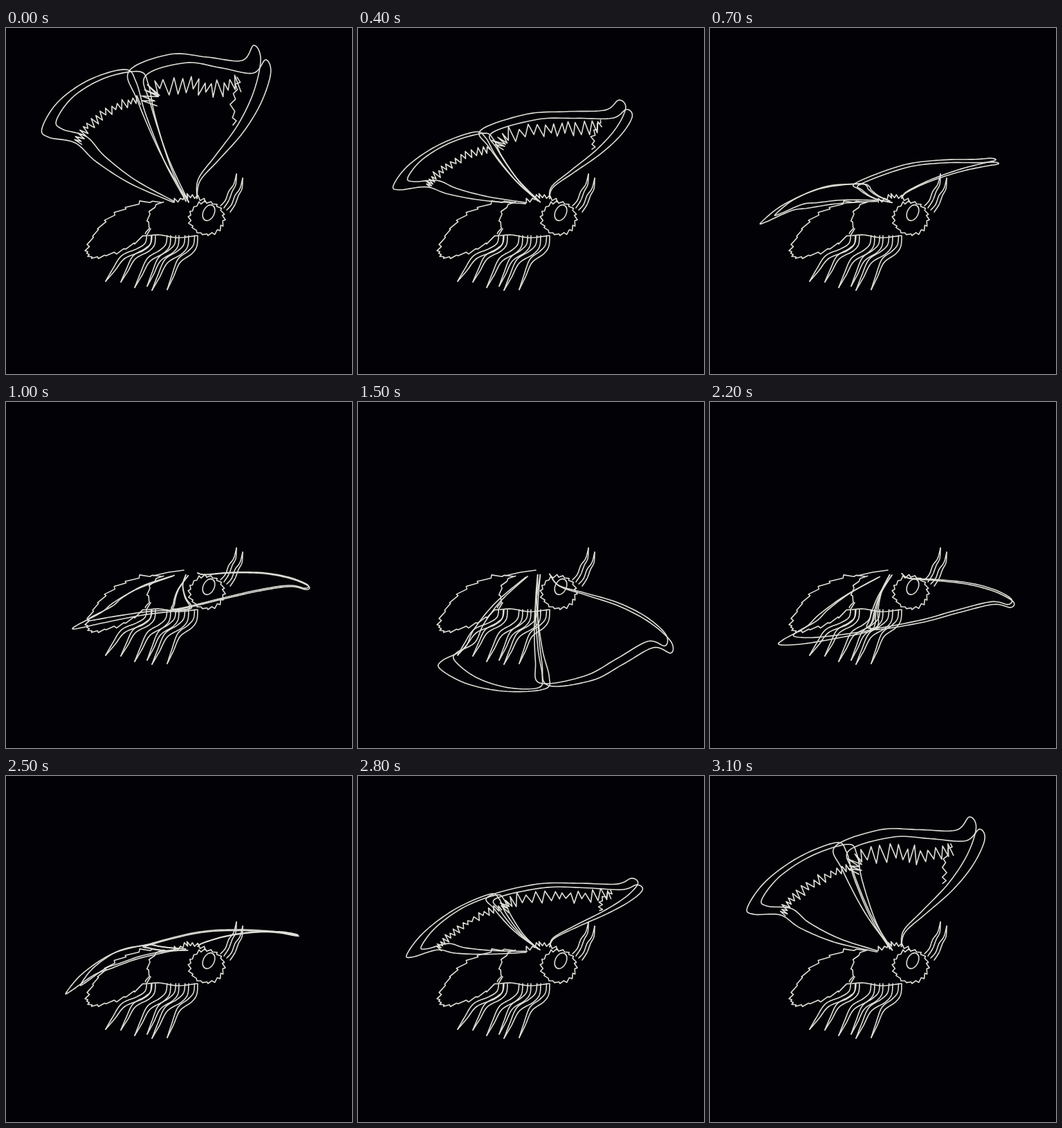
Write an HTML page with a canvas that moves like this. It is 500x500 px and loops after 3200 ms.

```html
<!DOCTYPE html>
<html lang="en">
<head>
<meta charset="utf-8">
<title>Moth in flight</title>
<style>
html, body { margin: 0; width: 100%; height: 100%; overflow: hidden; background: #020206; }
canvas { display: block; width: 500px; height: 500px; }
</style>
</head>
<body>
<canvas id="stage" width="500" height="500"></canvas>
<script>
const ctx = document.getElementById('stage').getContext('2d');
const LOOP = 3200, STEP = 100;

// The flap: where the tip and the inner corner of each wing are over time.
const flap = [
  { t: 0,    fore: [360,25, 178,60],    hind: [52,145, 174,60] },
  { t: 400,  fore: [379,104, 178,146],  hind: [51,228, 170,150] },
  { t: 1000, fore: [436,271, 248,300],  hind: [99,328, 262,300] },
  { t: 1500, fore: [454,362, 276,411],  hind: [119,386, 272,414] },
  { t: 1900, fore: [453,348, 272,402],  hind: [112,376, 268,403] },
  { t: 2500, fore: [416,229, 203,244],  hind: [87,313, 203,244] },
  { t: 3100, fore: [377,59, 181,100],   hind: [54,190, 184,96] }
];

// Wing shapes in the raised pose; every other pose is a skewed copy.
// `gap` moves the tip and corner of the second outline.
const wings = {
  fore: {
    root: [270, 249], gap: [17,21, 24,7],
    outline: pairs([276,246, 278,218, 303,184, 335,140, 358,92, 368,45, 358,25, 341,47, 290,42, 237,38, 178,62, 190,105, 225,185, 264,252]),
    fringe: pairs([203,108, 213,84, 260,81, 300,87, 337,80]),
    edge: pairs([337,72, 328,104, 330,140])
  },
  hind: {
    root: [258, 250], gap: [21,-12, 20,3],
    outline: pairs([242,252, 180,225, 130,193, 100,166, 62,158, 52,145, 75,107, 120,75, 172,60, 188,78, 202,125, 230,195, 260,250]),
    fringe: pairs([102,164, 112,147, 135,128, 165,111, 193,104])
  }
};

function pairs(flat) {
  const out = [];
  for (let i = 0; i < flat.length; i += 2) out.push([flat[i], flat[i + 1]]);
  return out;
}

function random(seed) {
  return () => {
    seed = (seed * 1664525 + 1013904223) >>> 0;
    return seed / 4294967296;
  };
}

// Key i with its time unwrapped past either end of the loop.
function keyAt(i, name) {
  const n = flap.length, lap = Math.floor(i / n), key = flap[i - lap * n];
  return { t: key.t + lap * LOOP, v: key[name] };
}

// Smooth cubic through the keys of one wing.
function anchors(name, t) {
  let i = flap.length - 1;
  while (flap[i].t > t) i--;
  const [a, b, c, d] = [-1, 0, 1, 2].map(k => keyAt(i + k, name));
  const span = c.t - b.t, u = (t - b.t) / span, u2 = u * u, u3 = u2 * u;
  return b.v.map((p, k) => {
    const q = c.v[k];
    const m = (q - a.v[k]) / (c.t - a.t) * span;
    const n = (d.v[k] - p) / (d.t - b.t) * span;
    return (2*u3 - 3*u2 + 1) * p + (u3 - 2*u2 + u) * m + (3*u2 - 2*u3) * q + (u3 - u2) * n;
  });
}

// Maps raised-pose points so that tip and corner land on the given anchors.
function skew(pts, name, to) {
  const [rx, ry] = wings[name].root;
  const rel = ([tx, ty, cx, cy]) => [tx - rx, ty - ry, cx - rx, cy - ry];
  const [ax, ay, bx, by] = rel(flap[0][name]);
  const [tx, ty, cx, cy] = rel(to);
  const det = ax * by - bx * ay;
  const arch = 55 * Math.exp(-((cy / 70) ** 2));
  return pts.map(([x, y]) => {
    const dx = x - rx, dy = y - ry;
    const u = (dx * by - bx * dy) / det, v = (ax * dy - ay * dx) / det;
    return [rx + u * tx + v * cx, ry + u * ty + v * cy - arch * u * (1 - u)];
  });
}

function pointOn(pts, s) {
  const last = pts.length - 1;
  const i = Math.min(Math.floor(s * last), last - 1), u = s * last - i;
  const p = k => pts[Math.max(0, Math.min(last, i + k))];
  return [0, 1].map(x => {
    const a = p(-1)[x], b = p(0)[x], c = p(1)[x], d = p(2)[x];
    return b + u / 2 * (c - a + u * (2*a - 5*b + 4*c - d + u * (3*b - a - 3*c + d)));
  });
}

function line(pts) {
  ctx.beginPath();
  pts.forEach(([x, y]) => ctx.lineTo(x, y));
  ctx.stroke();
}

function curve(pts) {
  const n = (pts.length - 1) * 10;
  line(Array.from({ length: n + 1 }, (_, i) => pointOn(pts, i / n)));
}

// Zigzag along a curve; `lean` tips each tooth forward along it.
function fur(pts, teeth, out, back, lean, seed) {
  const rnd = random(seed), n = teeth * 2, path = [];
  for (let i = 0; i <= n; i++) {
    const tooth = i % 2;
    const shift = (tooth ? lean : 0) + 0.5 * (rnd() - 0.5);
    const s = Math.max(0, Math.min(1, (i + shift) / n));
    const [x, y] = pointOn(pts, s);
    const [x0, y0] = pointOn(pts, Math.max(0, s - 0.02));
    const [x1, y1] = pointOn(pts, Math.min(1, s + 0.02));
    const len = Math.hypot(x1 - x0, y1 - y0) || 1;
    const h = (tooth ? out : -back) * (0.4 + 0.9 * rnd());
    path.push([x + (y1 - y0) / len * h, y - (x1 - x0) / len * h]);
  }
  line(path);
}

function drawWing(name, t, lift, step) {
  const { outline, fringe, edge, gap } = wings[name];
  const near = anchors(name, t);
  const far = near.map((v, i) => v + gap[i] * (name === 'hind' && i < 2 ? 1 : lift));
  curve(skew(outline, name, near));
  curve(skew(outline, name, far));
  if (lift < 0.3) return;
  const size = name === 'fore' ? 4 + 9 * lift : 3 + 4 * lift;
  fur(skew(fringe, name, near), 16, size, size, 0, 40 + step * 7);
  if (edge) fur(skew(edge, name, near), 5, 3, 3, 0, 60 + step);
}

function drawLeg(x, y, tipX, tipY) {
  const dx = x - tipX, dy = tipY - y;
  const at = (fx, fy) => [tipX + dx * fx, y + dy * fy];
  curve([at(1, 0), at(0.97, 0.2), at(0.8, 0.34), at(0.42, 0.5), at(0.2, 0.77), at(0, 1)]);
  curve([at(0.9, 0), at(0.86, 0.17), at(0.68, 0.29), at(0.35, 0.44), at(0.15, 0.74), at(0, 1)]);
}

function drawAntenna(x, y) {
  for (const w of [0, 5]) {
    curve([[310 + w, 257 + w * 0.6], [317 + w, 249], [322 + w, 236], [329 + w * 0.6, 226], [333, 211]]
      .map(([px, py]) => [px + x, py + y]));
  }
}

function drawBody(wingsDown) {
  // abdomen, top and underside
  fur(pairs([224,252, 194,254, 163,267, 139,285, 125,305, 118,324]), 9, -4, 0, 0.8, 11);
  fur(pairs([209,290, 180,314, 150,326, 126,331, 118,324]), 9, 3, 0, 0.8, 5);
  // thorax
  fur(pairs([228,252, 214,262, 207,276, 209,288, 202,298]), 5, -4, 1, 0.6, 23);
  if (wingsDown) line([[213, 251], [235, 246], [257, 243]]);
  else fur(pairs([243,251, 258,246, 270,243, 288,250]), 7, 4, 2, 0, 31);
  curve(pairs([205,300, 222,299, 248,303, 276,300]));
  // head
  const ring = Array.from({ length: 17 }, (_, i) => {
    const a = i / 16 * Math.PI * 2 - Math.PI / 2;
    return [290 + 24 * Math.cos(a), 275 + 23 * Math.sin(a)];
  });
  fur(ring, 18, 3, 1, 0.5, 17);
  ctx.beginPath();
  ctx.ellipse(293, 267, 8, 12, 0.45, 0, Math.PI * 2);
  ctx.stroke();
  drawAntenna(0, 0);
  drawAntenna(9, 6);
  [[210, 144, 366], [216, 166, 367], [238, 186, 375],
   [250, 204, 373], [264, 211, 379], [277, 233, 378]].forEach(([x, tx, ty]) => drawLeg(x, 300, tx, ty));
}

function draw(now) {
  const step = Math.floor(now % LOOP / STEP), t = step * STEP;
  const lift = (250 - anchors('fore', t)[1]) / 225;
  ctx.fillStyle = '#020206';
  ctx.fillRect(0, 0, 500, 500);
  ctx.strokeStyle = '#dedfd8';
  ctx.lineWidth = 1.6;
  ctx.lineJoin = ctx.lineCap = 'round';
  drawWing('hind', t, lift, step);
  drawWing('fore', t, lift, step);
  drawBody(lift < 0);
}

const start = performance.now();
function tick() {
  draw(performance.now() - start);
  requestAnimationFrame(tick);
}
tick();
</script>
</body>
</html>
```
